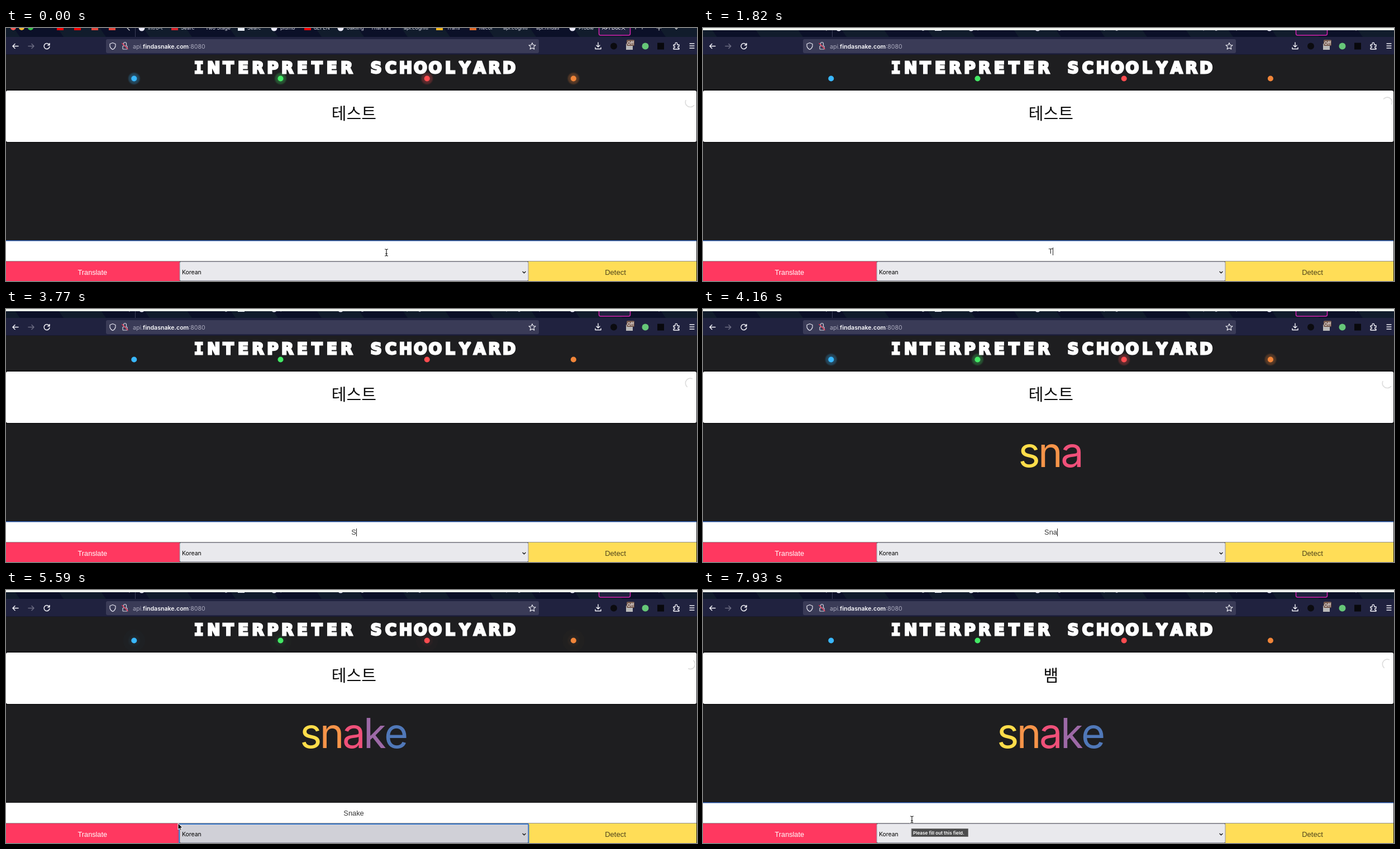
An HTML page with a canvas for the animation above (8000 ms loop, 1237 px wide and 453 px high).

```html
<!DOCTYPE html>
<html lang="ko">
<head>
<meta charset="utf-8">
<style>
html, body { margin: 0; width: 100%; height: 100%; overflow: hidden; background: #1e1e20; }
canvas { display: block; width: 1237px; height: 453px; }
</style>
</head>
<body>
<canvas id="stage" width="1237" height="453"></canvas>
<script>
const ctx = document.getElementById('stage').getContext('2d');
const W = 1237, H = 453, LOOP = 8000, STEP = 130, TAU = Math.PI * 2;
const UI = 'Inter, sans-serif';
const ARIAL = '"Liberation Sans", Arial, sans-serif';
const HANGUL = '"Noto Sans CJK KR", "Noto Sans CJK", sans-serif';
const RAINBOW = ['#ffdd4a', '#f79449', '#ef5079', '#9d69a6', '#5078b8'];

// State changes as [time, value]; the latest one reached applies.
const typed = [[0, ''], [1820, 'T'], [2210, 'TE'], [2990, 'T'], [3120, ''], [3640, 'S'],
  [3900, 'Sn'], [4030, 'Sna'], [4290, 'Snak'], [4420, 'Snake'], [6760, '']];
const echoed = [[0, ''], [2080, 't'], [2470, 'te'], [3120, 't'], [3250, ''], [3900, 's'],
  [4030, 'sn'], [4160, 'sna'], [4420, 'snak'], [4550, 'snake']];
const focus = [[0, 'input'], [5200, 'select'], [6110, 'button'], [7020, 'input']];
const suggestions = [[0, null],
  [650, ['supports@velvomarsh.com', 'gecko@velvomrash.com']], [1690, null],
  [4550, ['supports@velvomarsh.com', 'iguana@velvomarsh.com']], [5200, null]];
const pointer = [[0, 681, 402], [520, 681, 402], [1170, 678, 409], [5070, 678, 409], [5590, 308, 418],
  [5980, 162, 434], [6500, 162, 434], [7020, 374, 411], [8000, 374, 411]];

// The caret restarts its blink on each keystroke and on focus.
const caretStarts = [-390, 650, ...typed.slice(1, -1).map(k => k[0]), 7020];

const at = (track, t) => track.filter(k => k[0] <= t).pop()[1];

function pointerAt(t) {
  const i = Math.max(1, pointer.findIndex(k => k[0] > t));
  const [a, b] = [pointer[i - 1], pointer[i]];
  const u = (t - a[0]) / (b[0] - a[0]), e = u * u * (3 - 2 * u);
  return [a[1] + (b[1] - a[1]) * e, a[2] + (b[2] - a[2]) * e];
}

function rect(x, y, w, h, fill) {
  ctx.fillStyle = fill;
  ctx.fillRect(x, y, w, h);
}

function round(x, y, w, h, r, fill, stroke, lw = 1) {
  ctx.beginPath();
  ctx.roundRect(x, y, w, h, r);
  if (fill) { ctx.fillStyle = fill; ctx.fill(); }
  if (stroke) { ctx.strokeStyle = stroke; ctx.lineWidth = lw; ctx.stroke(); }
}

function disc(x, y, r, fill) {
  ctx.fillStyle = fill;
  ctx.beginPath();
  ctx.arc(x, y, r, 0, TAU);
  ctx.fill();
}

function path(d, x, y, stroke, lw = 1.4, fill) {
  const p = new Path2D(d);
  ctx.save();
  ctx.translate(x, y);
  ctx.lineWidth = lw;
  ctx.lineCap = ctx.lineJoin = 'round';
  if (fill) { ctx.fillStyle = fill; ctx.fill(p); }
  if (stroke) { ctx.strokeStyle = stroke; ctx.stroke(p); }
  ctx.restore();
}

function text(s, x, y, font, fill, align = 'left') {
  ctx.font = font;
  ctx.fillStyle = fill;
  ctx.textAlign = align;
  ctx.fillText(s, x, y);
  return ctx.measureText(s).width;
}

function drawTabs() {
  rect(0, 0, W, 16, '#0b1028');
  for (let x = -62; x < W; x += 154) {
    path('M0 0H76L87 16H11Z', x, 0, null, 0, '#111c2c');
  }
  disc(13, -1, 5, '#ff5a52');
  disc(28, -1, 5, '#f6bd30');
  disc(44, -1, 5, '#35c748');
  for (const [x, c] of [[97, '#f00'], [128, '#f00'], [159, '#e5473b'], [190, '#e5473b'],
    [302, '#d8232a'], [540, '#f00'], [776, '#f3b61d'], [836, '#e06a28']]) rect(x - 6, -8, 12, 12, c);
  rect(415, -4, 12, 9, '#e8eef8');
  for (const x of [243, 480, 599, 1014]) disc(x, 0, 5.5, '#eef');
  rect(231, 0, 1, 16, '#3a3d58');
  path('M2 -4L-2 0L2 4', 219, 0, '#ddd', 1.2);
  const tabs = [[254, 'Intro-t'], [313, 'Searc'], [357, 'Two Stage'], [432, 'Searc'], [491, 'plumb'],
    [551, 'dEFEN'], [610, 'oakling'], [653, 'That is a'], [712, 'api.cogniti'], [789, 'Trans'], [847, 'Recor'],
    [890, 'api.cogniti'], [949, 'api.findas'], [1025, 'Proble']];
  for (const [x, s] of tabs) text(s, x, 3, '9px ' + UI, '#d5d6e2');
  round(1061.5, -12, 56, 25, 3, '#20223f', '#d321ae', 1.5);
  text('API Doc', 1067, 3, '9px ' + UI, '#fff');
  path('M-3 -3L3 3M3 -3L-3 3', 1105, 0, '#fff', 1);
  path('M0 -4V2M12 -4V2', 1127, 0, '#ddd', 1);
  path('M-4 0H4M0 -4V4', 1169, 0, '#ddd', 1.2);
  path('M-3 -1L0 2L3 -1', 1200, 0, '#ddd', 1.2);
}

function drawToolbar() {
  const ink = '#f4f4fa';
  rect(0, 16, W, 32, '#20223f');
  rect(0, 47, W, 1, '#17182c');
  round(179, 20, 775, 25, 3, '#3a3b57');
  path('M5 0H-5M-1 -4L-5 0L-1 4', 17, 32.5, ink, 1.5);
  path('M-5 0H5M1 -4L5 0L1 4', 45, 32.5, '#6b6c82', 1.5);
  path('M4.2 -2.8A5 5 0 1 0 5 1M5 -5V-1.8H1.8', 73, 32.5, ink, 1.5);
  path('M0 -6L5 -4V0Q4 4 0 6Q-4 4 -5 0V-4Z', 191, 32.5, '#e3e3ee', 1.2);
  round(209, 32, 8, 6, 1, null, '#d5d5e0', 1.2);
  path('M-2.5 0V-3A2.5 2.5 0 0 1 2.5 -3V0', 213, 31, '#d5d5e0', 1.2);
  path('M-5 -5L5 5', 213, 32.5, '#ef3d5b', 1.4);
  let x = 227;
  x += text('api.', x, 37, '10.6px ' + UI, '#aaaabd');
  x += text('findasnake.com', x, 37, '600 10.6px ' + UI, '#fbfbfe');
  text(':8080', x, 37, '10.6px ' + UI, '#aaaabd');
  path('M0 -6L1.8 -2L6 -1.6L2.8 1.2L3.8 5.4L0 3.2L-3.8 5.4L-2.8 1.2L-6 -1.6L-1.8 -2Z', 942, 32.5, ink, 1.1);
  path('M0 -6V2M-3 -1L0 2L3 -1M-5 3V5.5H5V3', 1060, 32, ink, 1.4);
  disc(1088, 32.5, 6, '#0b0b0f');
  rect(1110, 28, 12, 11, '#b9b9b9');
  round(1111, 21, 14, 11, 2, '#775c50');
  text('Off', 1118, 29.5, '500 8px ' + UI, '#fff', 'center');
  disc(1144.5, 32.5, 6, '#66c778');
  rect(1166, 26.5, 12, 12, '#08080c');
  path('M-5 -2H-2V-4A1.8 1.8 0 0 1 1.6 -4V-2H5V1H3.5A1.7 1.7 0 0 0 3.5 4H5V6H-5V3.5H-3.5A1.7 1.7 0 0 0 -3.5 .5H-5Z', 1200, 32, ink, 1.3);
  path('M-4 -4H4M-4 0H4M-4 4H4', 1228, 32, ink, 1.3);
}

function drawTitle() {
  const pitch = 26.45;
  ctx.lineJoin = 'miter';
  ctx.miterLimit = 2;
  ctx.strokeStyle = '#fff';
  ctx.lineWidth = 2.8;
  [...'INTERPRETER SCHOOLYARD'].forEach((ch, i) => {
    const face = ch === 'I' ? '"DejaVu Sans Mono", monospace' : '"DejaVu Sans", sans-serif';
    const x = 345.2 + i * pitch;
    text(ch, x, 81.3, 'bold 28px ' + face, '#fff', 'center');
    ctx.strokeText(ch, x, 81.3);
  });
}

function drawDots(t) {
  const p = (t / 1040 + 0.2) % 1, life = Math.max(0, 1 - p / 0.68);
  ['57,183,255', '67,233,101', '255,76,80', '241,133,57'].forEach((rgb, i) => {
    const x = 229.3 + i * 262.2, y = 90.5;
    if (life > 0) {
      disc(x, y, 5 + p * 26, `rgba(${rgb},${0.08 * life})`);
      const glow = ctx.createRadialGradient(x, y, 5, x, y, 12);
      glow.addColorStop(0, `rgba(${rgb},${0.4 * life})`);
      glow.addColorStop(0.6, `rgba(${rgb},${0.22 * life})`);
      glow.addColorStop(1, `rgba(${rgb},0)`);
      disc(x, y, 12, glow);
    }
    disc(x, y, 5, `rgb(${rgb})`);
  });
}

function drawPanel(t) {
  rect(0, 110.5, 1236, 95, '#0c0c0e');
  round(0, 112, 1236, 92, 3, '#fff');
  text(t < 6760 ? '테스트' : '뱀', 622.8, 164, '29px ' + HANGUL, '#0a0a0a', 'center');
  const mid = (122 + t / 520 * 360) * Math.PI / 180;
  ctx.strokeStyle = '#dbdbdb';
  ctx.lineWidth = 1.6;
  ctx.lineCap = 'round';
  ctx.beginPath();
  ctx.arc(1225, 132.8, 8.7, mid - 1.4, mid + 1.4);
  ctx.stroke();
}

function drawEcho(word) {
  const tracking = -3.5;
  ctx.font = '74px ' + UI;
  const widths = [...word].map(ch => ctx.measureText(ch).width + tracking);
  let x = 623.2 - (widths.reduce((a, b) => a + b, 0) - tracking) / 2;
  [...word].forEach((ch, i) => {
    text(ch, x, 282.5, '74px ' + UI, RAINBOW[i]);
    x += widths[i];
  });
}

function drawForm(t) {
  const active = at(focus, t), list = at(suggestions, t);
  rect(0, 381, 1236, 36.5, '#fff');
  if (active === 'input') rect(0, 380, 1236, 1.5, '#2452a4');
  const width = text(at(typed, t), 622.5, 404, '12.8px ' + ARIAL, '#363636', 'center');
  const blinkStart = caretStarts.filter(s => s <= t).pop();
  if (active === 'input' && (t - blinkStart) % 520 < 260) {
    rect(Math.round(622.5 + width / 2), 393, 1, 14, '#222');
  }

  if (list) {
    rect(0, 418, W, 35, '#1d1d1f');
    list.forEach((s, i) => text(s, 3, 431 + i * 16, '9.6px ' + UI, '#f4f4f4'));
    return;
  }
  rect(0, 418, 311, 35, '#ff3860');
  rect(935, 418, 301, 35, '#ffdd57');
  const picked = active === 'select';
  round(311, 418.5, 624, 34, 2, picked ? '#d0d0d7' : '#e9e9ed', '#8f8f9d');
  if (picked) round(310, 419, 625.5, 36, 2, null, '#3c78c8', 2);
  text('Translate', 154.8, 442, '12.7px ' + ARIAL, '#fff', 'center');
  text('Detect', 1091, 442, '13px ' + ARIAL, 'rgba(0,0,0,.7)', 'center');
  text('Korean', 315, 441.3, '10.4px ' + UI, '#000');
  path('M-2.5 -1.2L0 1.3L2.5 -1.2', 927.5, 437.5, '#111', 1.3);
}

function drawPointer(t) {
  if (t >= 1820 && t < 5070) return;
  const [x, y] = pointerAt(t);
  if (y < 417) {
    const beam = 'M-2.5 -6Q0 -6 0 -4.5Q0 -6 2.5 -6M0 -4.5V4.5M-2.5 6Q0 6 0 4.5Q0 6 2.5 6M-1.5 2H1.5';
    path(beam, x, y, '#fff', 2.6);
    path(beam, x, y, '#111', 1.1);
  } else {
    path('M0 0V11L2.6 8.6L4.3 12.4L6.2 11.5L4.5 7.9H8Z', x, y, '#fff', 1, '#000');
  }
}

function drawTooltip() {
  round(373.5, 427.5, 101, 14, 0, '#4c4c4d', '#777');
  text('Please fill out this field.', 376, 437.6, '600 8.2px ' + UI, '#fff');
}

function draw(now) {
  const t = Math.floor((now % LOOP) / STEP) * STEP;
  rect(0, 0, W, H, '#1e1e20');
  drawTabs();
  drawToolbar();
  if (t >= 520) rect(0, 0, W, 4, '#eff3ee');
  drawDots(t);
  drawTitle();
  drawPanel(t);
  drawEcho(at(echoed, t));
  drawForm(t);
  if (t >= 7540) drawTooltip();
  drawPointer(t);
}

const start = performance.now();
function tick() {
  draw(performance.now() - start);
  requestAnimationFrame(tick);
}
tick();
</script>
</body>
</html>
```
